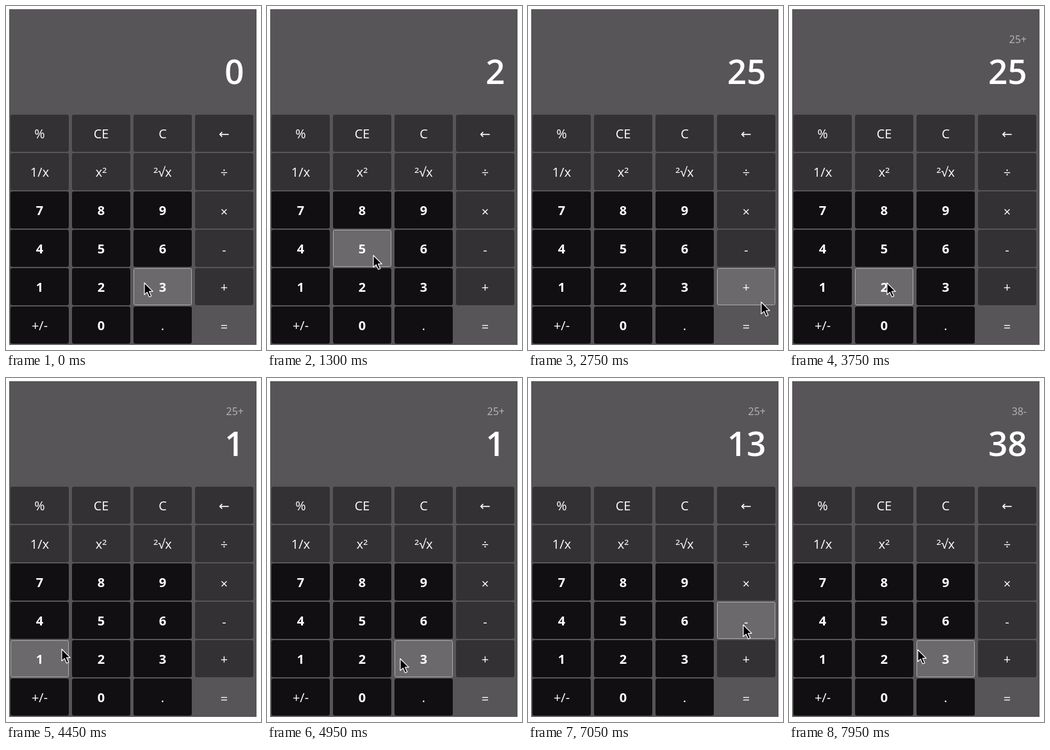
These frames come from a looping animation (398x538 px, 8 s). An HTML page:

```html
<!DOCTYPE html>
<html lang="en">
<head>
<meta charset="utf-8">
<title>Calculator</title>
<style>
  html, body { margin: 0; width: 100%; height: 100%; overflow: hidden; background: #fff; }
  svg { display: block; width: 398px; height: 538px; }
  text { font: 500 20px "Open Sans", "Noto Sans", "DejaVu Sans", sans-serif; fill: #fff; }
  rect { fill: var(--face); stroke: var(--edge, var(--face)); }
  .op { --face: #333133; }
  .num, .dark { --face: #110f11; }
  .num text { font-weight: 700; }
  .eq { --face: #575557; }
  .key.hover { --face: #6b696b; --edge: #adabad; }
  #panel { fill: #575557; stroke: none; }
  #total { font-size: 53px; font-weight: 600; }
  #history { font-size: 16px; fill: #b8b6b8; }
</style>
</head>
<body>
<svg viewBox="0 0 398 538">
  <rect id="panel" x="5" y="5" width="386" height="525"/>
  <text id="history" x="371" y="58" text-anchor="end"></text>
  <text id="total" x="371.5" y="122" text-anchor="end"></text>
  <g id="keys"></g>
  <path id="cursor" d="M0 0V18.5L4.3 14.6L7.6 22L10.8 20.6L7.6 13.4H13.2Z"
        fill="#000" stroke="#fff" stroke-width="1.2" stroke-linejoin="round"/>
</svg>
<script>
const LOOP = 8000, STEP = 50;
const HOLD = 250, MAX_TRAVEL = 750;
const WIDTH = 91, HEIGHT = 58;
const byId = id => document.getElementById(id);
const labels = '% CE C ← 1/x x² ²√x ÷ 7 8 9 × 4 5 6 - 1 2 3 + +/- 0 . ='.split(' ');

function svgNode(name, attrs, parent) {
  const node = document.createElementNS('http://www.w3.org/2000/svg', name);
  for (const key in attrs) node.setAttribute(key, attrs[key]);
  return parent.appendChild(node);
}

function kindOf(label) {
  if (label === '=') return 'eq';
  if (label === '.' || label === '+/-') return 'dark';
  return /\d$/.test(label) ? 'num' : 'op';
}

const keys = labels.map((label, i) => {
  const x = 7 + 96 * (i % 4), y = 170 + 60 * Math.floor(i / 4);
  const g = svgNode('g', { class: 'key ' + kindOf(label) }, byId('keys'));
  const drop = '×-='.includes(label) ? 38.5 : 37.3;
  svgNode('rect', { x: x + 0.5, y: y + 0.5, width: WIDTH - 1, height: HEIGHT - 1, rx: 2 }, g);
  svgNode('text', { x: x + WIDTH / 2, y: y + drop, 'text-anchor': 'middle' }, g).textContent = label;
  return { g, x, y };
});

// Each press: key, time, pointer offset from the key's centre
const presses = [
  ['3', -450, 25, -12], ['2', 450, 13, 0], ['5', 1500, 17, 11],
  ['+', 3000, 23, 24], ['1', 4235, 34, -15], ['3', 5347, -16, 2],
  ['-', 7250, -5, 7], ['2', 8400, 13, -3]
].map(([label, time, dx, dy]) => {
  const key = keys[labels.indexOf(label)];
  return { label, time, x: key.x + WIDTH / 2 + dx, y: key.y + HEIGHT / 2 + dy };
});

// Rest around each press, then glide to arrive just before the next
function pointerAt(t) {
  const next = presses.findIndex(p => p.time > t);
  const from = presses[next - 1], to = presses[next];
  const arrive = to.time - HOLD;
  const leave = Math.max(from.time + HOLD, arrive - MAX_TRAVEL);
  const u = Math.min(1, Math.max(0, (t - leave) / (arrive - leave)));
  const ease = u * u * (3 - 2 * u);
  return ['x', 'y'].map(axis => from[axis] + (to[axis] - from[axis]) * ease);
}

function readoutAt(t) {
  let history = '', total = '0', fresh = true;
  for (const { label, time } of presses) {
    if (time < 0 || time > t) continue;
    if (/\d/.test(label)) {
      total = fresh ? label : total + label;
      fresh = false;
    } else {
      const sign = history.endsWith('-') ? -1 : 1;
      if (history) total = String(parseInt(history) + sign * total);
      history = total + label;
      fresh = true;
    }
  }
  return { history, total };
}

function draw(now) {
  const t = Math.floor(now % LOOP / STEP) * STEP;
  const [x, y] = pointerAt(t);
  byId('cursor').setAttribute('transform', `translate(${Math.round(x)} ${Math.round(y)})`);
  for (const key of keys) {
    const inside = x >= key.x && x <= key.x + WIDTH && y >= key.y && y <= key.y + HEIGHT;
    key.g.classList.toggle('hover', inside);
  }
  const { history, total } = readoutAt(t);
  byId('history').textContent = history;
  byId('total').textContent = total;
}

const start = performance.now();
function tick() {
  draw(performance.now() - start);
  requestAnimationFrame(tick);
}
tick();
</script>
</body>
</html>
```
